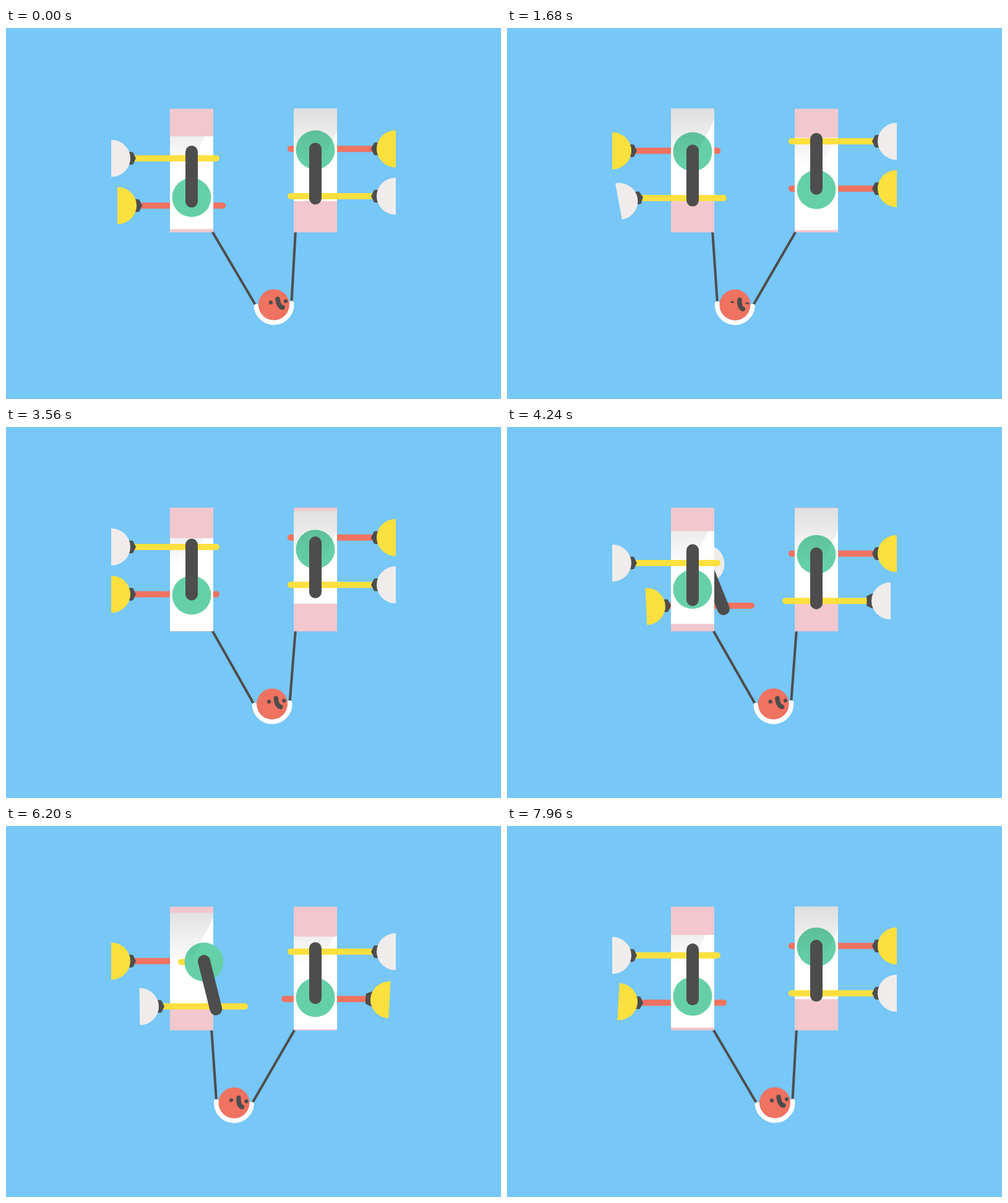
An HTML page with a canvas that plays this animation: 800 px wide and 600 px high, repeating every 8000 ms.

```html
<!DOCTYPE html>
<html lang="en">
<head>
<meta charset="utf-8">
<title>Climbers with a swing</title>
<style>
  html, body { margin: 0; width: 100%; height: 100%; overflow: hidden; background: #77c7f7; }
  canvas { display: block; }
</style>
</head>
<body>
<canvas id="stage" width="800" height="600"></canvas>
<script>
const ctx = document.getElementById('stage').getContext('2d');
const LOOP = 8000, CYCLE = 4000, TAU = Math.PI * 2, RAD = Math.PI / 180;
const STEP = 153, ROD = 80;
const C = {
  sky: '#77c7f7', pink: '#f2c7ce', white: '#ffffff', green: '#65d0a7',
  dark: '#4d4d4d', yellow: '#fce03e', red: '#f07260', pale: '#f0eceb'
};

// Sine ease from 0 at time a to 1 at time b.
function ramp(t, a, b) {
  const u = Math.min(1, Math.max(0, (t - a) / (b - a)));
  return (1 - Math.cos(Math.PI * u)) / 2;
}

// cubic-bezier(x1, 0, x2, 1)
function bezier(x1, x2) {
  return t => {
    const p = Math.min(1, Math.max(0, t));
    let lo = 0, hi = 1, s = 0.5;
    for (let i = 0; i < 24; i++) {
      s = (lo + hi) / 2;
      const q = 1 - s;
      if (3 * q * q * s * x1 + 3 * q * s * s * x2 + s * s * s < p) lo = s; else hi = s;
    }
    return s * s * (3 - 2 * s);
  };
}

const swingEase = bezier(0.41, 0.335);
const armEase = bezier(0.614, 0.406);

// A limb's cycle runs from -400 to 3600: tug, let go, swing up, stick, ride down.
const phase = t => ((t + 400) % CYCLE + CYCLE) % CYCLE - 400;
const ride = p => STEP * (p + 400) / CYCLE;
const slide = p => ramp(p, 1600, 3600);
const tug = p => ramp(p, -400, -340);
const armAngle = p => Math.PI * armEase(p / 800);
const lean = p => 20 * (ramp(p, 60, 200) - ramp(p, 560, 900));
const discY = p => 197 + ride(p) - STEP * slide(p);
const jointY = p => 195.5 + ride(p) - (STEP - ROD) * slide(p);

function tilt(p) {
  const wobble = p < 0 ? tug(p) * Math.sqrt(-p / 320) * Math.cos(TAU * (p + 320) / 640) : 0;
  return -10.5 * wobble - 17 * (ramp(p, 160, 480) - ramp(p, 480, 760));
}

function line(x1, y1, x2, y2, width, color, cap = 'round') {
  ctx.beginPath();
  ctx.moveTo(x1, y1);
  ctx.lineTo(x2, y2);
  ctx.lineWidth = width;
  ctx.lineCap = cap;
  ctx.strokeStyle = color;
  ctx.stroke();
}

function disc(x, y, r, color) {
  ctx.beginPath();
  ctx.arc(x, y, r, 0, TAU);
  ctx.fillStyle = color;
  ctx.fill();
}

function rect(x, y, w, h, color) {
  ctx.fillStyle = color;
  ctx.fillRect(x, y, w, h);
}

function polygon(points, color) {
  ctx.beginPath();
  points.forEach(([x, y]) => ctx.lineTo(x, y));
  ctx.closePath();
  ctx.fillStyle = color;
  ctx.fill();
}

function mirror(axis) {
  ctx.translate(2 * axis, 0);
  ctx.scale(-1, 1);
}

// The plunger runs slightly ahead of the rod that throws it.
function plunger(p, barColor, cupColor, right) {
  const a = armAngle(p + 15);
  const dx = lean(p) + ROD * Math.sin(a) + 10 * (tug(p) - ramp(p, 100, 260));
  const y = 119 + ride(p) + STEP * (1 + Math.cos(a)) / 2;
  line(206 + dx, y, 340 + dx, y, 10, barColor);
  ctx.save();
  ctx.translate(200 + dx, y);
  ctx.rotate(tilt(p) * RAD);
  polygon(right && dx > 0.5
    ? [[-3, -12], [0, -12], [8.7, -8], [8.7, 8], [0, 12], [-3, 12]]
    : [[-3, -10.5], [5, -10], [10, 0], [5, 10], [-3, 10.5]], C.dark);
  ctx.beginPath();
  ctx.ellipse(-30, 0, 31, 30, 0, -Math.PI / 2, Math.PI / 2);
  ctx.fillStyle = cupColor;
  ctx.fill();
  ctx.restore();
}

function rod(p) {
  const x = 300 + lean(p), y = jointY(p), a = armAngle(p);
  line(x, y, x + ROD * Math.sin(a), y + ROD * Math.cos(a), 20, C.dark);
}

// The diagonal shadow falls the same way on both sides, so it undoes the mirroring.
function shade(top, right) {
  const edge = right ? 168 : 148;
  ctx.save();
  ctx.beginPath();
  ctx.rect(265, top, 70, 150);
  ctx.clip();
  if (right) mirror(300);
  const g = ctx.createLinearGradient(0, 130, 0, 225);
  g.addColorStop(0, 'rgba(0,0,0,.13)');
  g.addColorStop(1, 'rgba(0,0,0,0)');
  polygon([[265, 130], [335, 130], [335, edge], [265, edge + 140]], g);
  ctx.restore();
}

function climber(front, right) {
  const back = phase(front + CYCLE / 2);
  const top = 155 - 25 * Math.cos(TAU * (front + 400) / CYCLE);
  const y = discY(front);
  ctx.save();
  if (right) mirror(400);
  plunger(back, C.red, C.yellow, right);
  disc(300 + lean(back), discY(back), 31.5, C.pale);
  rod(back);

  rect(265, 130.5, 70, 200, C.pink);
  rect(265, top, 70, 150, C.white);
  line(283, y, 300, y, 10, C.yellow);
  disc(300 + lean(front), y, 31.5, C.green);
  shade(top, right);
  plunger(front, C.yellow, C.pale, right);
  rod(front);
  ctx.restore();
}

function swing(t) {
  const half = (t % CYCLE) / (CYCLE / 2);
  const p = half < 1 ? swingEase(half) : 1 - swingEase(half - 1);
  const u = 1 - 2 * p;
  const x = 400 + 33 * u, y = 450 - 2.3 * u * u, a = -5 * u * u * u * RAD;
  const cx = 28.5 * Math.cos(a), cy = 28.5 * Math.sin(a);
  line(332, 327, x - cx, y - cy, 4, C.dark, 'butt');
  line(468, 327, x + cx, y + cy, 4, C.dark, 'butt');

  ctx.save();
  ctx.translate(x, y);
  ctx.rotate(a);
  ctx.beginPath();
  ctx.arc(0, 0, 28.5, 0, Math.PI);
  ctx.lineWidth = 8;
  ctx.lineCap = 'round';
  ctx.strokeStyle = C.white;
  ctx.stroke();
  disc(0, -0.2, 25, C.red);

  const open = Math.min(1, Math.abs(t - 1720) / 100);
  ctx.fillStyle = C.dark;
  for (const ex of [-4.7, 19.6]) {
    ctx.beginPath();
    ctx.ellipse(ex, -4.2, 3.1, Math.max(1.5, 3.1 * open), 0, 0, TAU);
    ctx.fill();
  }
  ctx.beginPath();
  ctx.moveTo(6.8, -8.8);
  ctx.quadraticCurveTo(7, 3.5, 13.4, 5.5);
  ctx.lineWidth = 7.5;
  ctx.strokeStyle = C.dark;
  ctx.stroke();
  ctx.restore();
}

function draw(t) {
  rect(0, 0, 800, 600, C.sky);
  swing(t);
  climber(phase(t - 2000), false);
  climber(phase(t - 400), true);
}

const start = performance.now();
function tick() {
  draw((performance.now() - start) % LOOP);
  requestAnimationFrame(tick);
}
tick();
</script>
</body>
</html>
```
